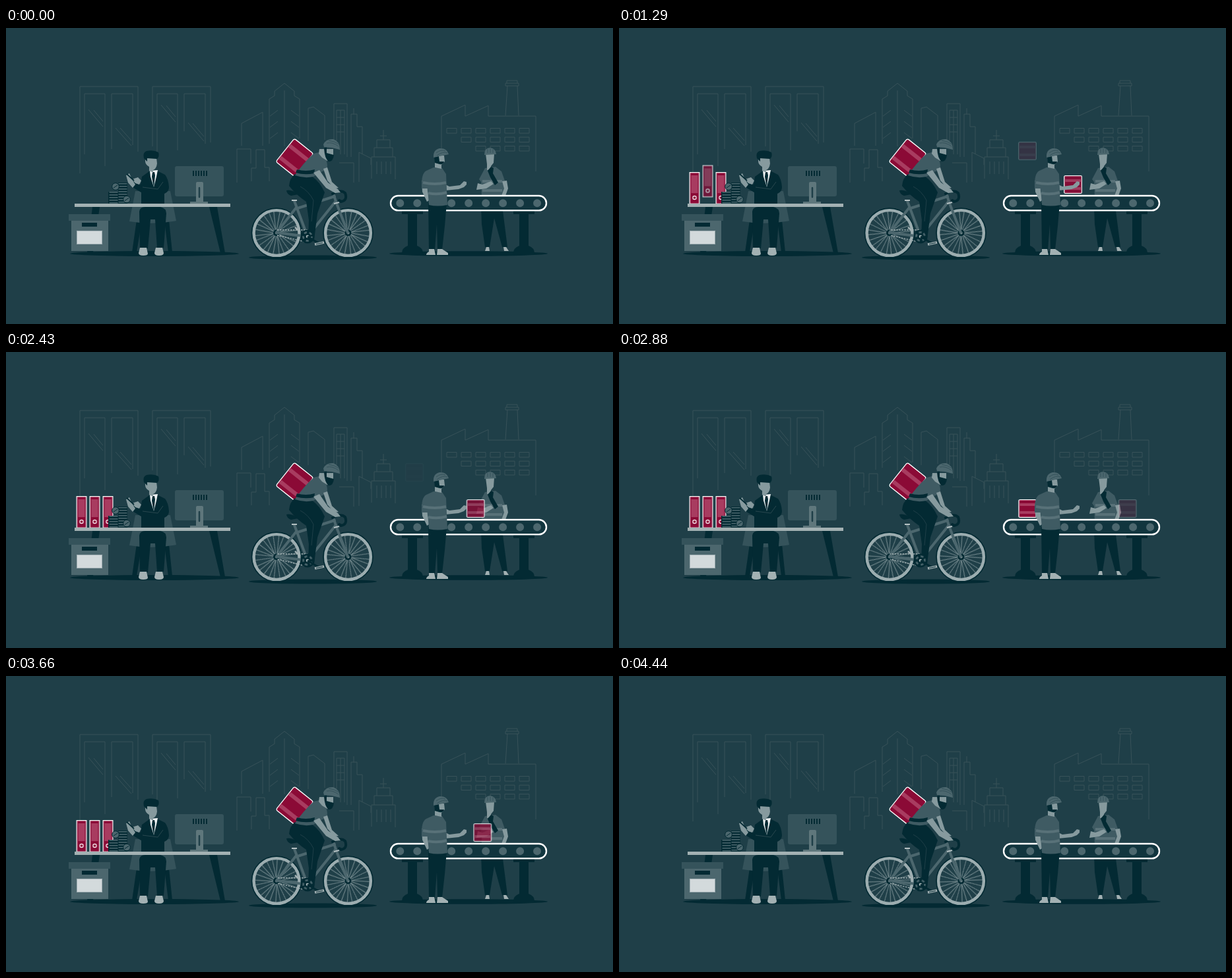
Animation of 920 by 450 pixels, one loop 4.47 s. Source, as an HTML page without scripts:

```html
<!DOCTYPE html>
<html lang="en">
<head>
<meta charset="utf-8">
<title>Work scenes</title>
<style>
  html, body { margin: 0; width: 100%; height: 100%; overflow: hidden; background: #1f3f48; }
  svg { display: block; width: 100%; height: 100%; }

  .dark { fill: #032a33; }
  .deep { fill: #35535b; }
  .cloth { fill: #3f5b63; }
  .mid { fill: #4c676e; }
  .skin { fill: #869a9e; }
  .light { fill: #a3b1b3; }
  .red { fill: #8b0a36; }
  .pink { fill: #a83c60; }
  .line { fill: none; stroke: #385259; }
  .band { fill: none; stroke: #587178; stroke-width: 4; }
  .tube { fill: none; stroke: #4c676e; stroke-width: 4; stroke-linecap: round; stroke-linejoin: round; }
  .edge { stroke: #fff; stroke-width: 1.3; }

  .folder { animation: folder-drop 4470ms infinite both, folder-fade 4470ms linear infinite both; }
  .parcel { animation: parcel-path 4470ms infinite both, parcel-fade 4470ms linear infinite both; }
  .folder, .parcel { animation-delay: var(--at); }
  .spin { animation: spin 1490ms linear infinite; }
  .chain { animation: chain 298ms linear infinite; }

  @keyframes folder-drop {
    0% { transform: translateY(-79px); animation-timing-function: cubic-bezier(.45, 0, .55, 1); }
    6.71%, 100% { transform: none; }
  }
  @keyframes folder-fade {
    0% { opacity: 0; }
    6.71%, 67.34% { opacity: 1; }
    72.48%, 100% { opacity: 0; }
  }
  @keyframes parcel-path {
    0% { transform: translate(0, -55px); animation-timing-function: cubic-bezier(.45, 0, .55, 1); }
    6.71% { transform: translate(0, 0); }
    8.66% { transform: translate(0, 0); animation-timing-function: cubic-bezier(.65, 0, .32, 1); }
    43.56%, 100% { transform: translate(157px, 0); }
  }
  @keyframes parcel-fade {
    0% { opacity: 0; }
    6.71%, 24% { opacity: 1; }
    40.6%, 100% { opacity: 0; }
  }
  @keyframes spin { to { transform: rotate(360deg); } }
  @keyframes chain { to { stroke-dashoffset: -4; } }
</style>
</head>
<body>
<svg viewBox="0 0 920 450" xmlns="http://www.w3.org/2000/svg">
  <defs>
    <g id="folder">
      <rect class="red edge" x=".7" y=".7" width="14.6" height="47.6"/>
      <rect class="pink" x="3" y="5" width="10" height="27"/>
      <circle cx="8" cy="39" r="2.6" fill="none" stroke="#fff" stroke-width="1.2"/>
    </g>
    <g id="parcel">
      <rect class="red edge" x=".7" y=".7" width="26.6" height="26.6" rx="1.5"/>
      <path class="pink" d="M1.4 6H26.6V10H1.4ZM1.4 18H26.6V22H1.4Z"/>
    </g>
    <path id="spokes" d="M1 4L4 33M-1 4L-5 33M2 3L13 30" fill="none" stroke="#93a5a8" stroke-width=".8"/>
    <g id="quarter">
      <use href="#spokes"/>
      <use href="#spokes" transform="rotate(45)"/>
    </g>
    <g id="wheel">
      <circle r="37.4" fill="none" stroke="#032a33" stroke-width="1.8"/>
      <g class="spin">
        <use href="#quarter"/>
        <use href="#quarter" transform="rotate(90)"/>
        <use href="#quarter" transform="rotate(180)"/>
        <use href="#quarter" transform="rotate(270)"/>
      </g>
      <circle r="34.4" fill="none" stroke="#9cadb0" stroke-width="4.4"/>
      <circle class="dark" r="5"/>
      <circle class="light" r="2"/>
    </g>
    <path id="pane-row" d="M0 0h15v7.5H0Zm22 0h15v7.5H22Zm22 0h15v7.5H44Zm22 0h15v7.5H66Z"/>
    <path id="stand" class="dark" d="M0 278H32V283H23V331Q32 334 32 343H0Q0 334 9 331V283H0Z"/>
  </defs>

  <rect width="920" height="450" fill="#1f3f48"/>

  <!-- Backdrop -->
  <g class="line">
    <path d="M112 221V89H200V188M119 192V100H150V210M160 184V100H192V178"/>
    <path d="M125 124L147 150M133 125L147 142M166 152L190 179M173 152L190 171"/>
    <path d="M222 180V89H310V174M229 192V100H260V186M270 157V100H302V176"/>
    <path d="M235 117L257 143M243 118L257 135M276 144L300 172M283 145L300 165"/>

    <path d="M350 235V184H371V206M357 179V145L389 128V179M372 233V213H379V185H392V212H399V233"/>
    <path d="M399 176V108L407 103V96L422 84L437 96V103L445 108V168M422 95V180"/>
    <path d="M400 134L412 125M400 151L412 142M400 168L412 159M432 125L444 134M432 142L444 151M432 159L444 168"/>
    <path d="M458 172V122L466 120L483 133V170M497 171V115H517V196M501 171V125H513V192"/>
    <path d="M501 136H513M501 147H513M501 158H513M507 125V192M505 205H527V235"/>
    <path d="M523 196V131H532V150H540V192M527 131V122M535 234V189L553 198V208"/>
    <path d="M554 229V196H590V230M558 196V182H586V196M562 182V170H582V182M572 170V155M567 164H577M562 203V222M569 203V222M576 203V222M583 203V222"/>

    <path d="M660 187V134L696 117V134L731 118V134H803V218M757 133L760 88M777 133L775 88M757 84H777V88H757ZM759 84V80H775V84"/>
    <path d="M668 152.5h15v7.5H668ZM690 152.5h15v7.5H690ZM690 166h15v7.5H690Z"/>
    <use href="#pane-row" x="712" y="152.5"/>
    <use href="#pane-row" x="712" y="166"/>
    <use href="#pane-row" x="712" y="179.5"/>
  </g>

  <!-- Office -->
  <ellipse class="dark" cx="225" cy="343" rx="128" ry="4"/>
  <path class="dark" d="M131 272H142L132 341H123ZM308 272H320L332 342H325ZM198 292H206L198 341H191ZM240 292H247L252 341H246Z"/>
  <path class="deep" d="M196 248H249L258 293Q222 300 187 294Z"/>
  <path class="mid" d="M99 293H155V339H99Z"/>
  <path class="deep" d="M95 283H158V293H95Z"/>
  <path class="dark" d="M115 296H138V302H115Z"/>
  <rect x="107.5" y="308.5" width="38" height="20" fill="#d3dadc" stroke="#9cabb0"/>

  <rect class="deep" x="256" y="210" width="74" height="46" rx="3"/>
  <path d="M284 217V225M288 217V225M292 217V225M296 217V225M300 217V225M304 217V225" stroke="#032a33" stroke-width="2"/>
  <rect x="288" y="234" width="11" height="32" rx="2" fill="#5f777c"/>
  <path d="M279 264H306V267H279Z" fill="#5f777c"/>
  <path d="M293 243V257" stroke="#1f3f48" stroke-width="2.5" stroke-linecap="round"/>

  <path class="dark" d="M206 226L217 218H231L241 223Q246 229 247 242Q247 249 240 252V268H205V250L190 241L193 232L204 238Z"/>
  <path d="M218 217L230 216L228 226L224 242L219 226Z" fill="#eef1f2"/>
  <path class="dark" d="M222 219H225L226 224L224 243L221 226Z"/>
  <path class="skin" d="M211 197H228L229 206Q228 214 223 216V220L217 217V211Q211 208 211 202Z"/>
  <path class="dark" d="M209 198Q207 189 213 187Q224 185 231 189Q233 195 229 199L214 198V203Z"/>
  <path d="M238 234L230 245L207 242" fill="none" stroke="#29474f"/>
  <path class="skin" d="M182 224L187 221L191 230L196 238L192 243L185 235ZM191 230L200 227L205 232L202 238L196 236Z"/>
  <path d="M183 222L194 232" stroke="#032a33" stroke-width="1.8"/>
  <path class="dark" d="M202 279Q203 272 211 272H234Q243 274 243 282L239 334H229L226 291H219L215 335H203Z"/>
  <path class="light" d="M203 334H213L215 343Q215 346 208 346Q201 346 201 342ZM227 334H237L239 342Q239 346 232 346Q225 346 225 342Z"/>

  <use class="folder" style="--at:680ms" href="#folder" x="146.5" y="219"/>
  <use class="folder" style="--at:880ms" href="#folder" x="106.5" y="219"/>
  <use class="folder" style="--at:1070ms" href="#folder" x="126.5" y="219"/>

  <path class="dark" d="M155 249H170V267H155ZM170 235H184V267H170Z"/>
  <path d="M163 249V267M177 236V267" stroke="#4c676e" stroke-width="13" stroke-dasharray="1.6 2.4"/>
  <g class="mid" stroke="#032a33">
    <circle cx="166" cy="241" r="5.3"/>
    <circle cx="183" cy="260.5" r="5.3"/>
    <path d="M163 243L169 239M180 262.5L186 258.5"/>
  </g>
  <rect class="light" x="104" y="267" width="236" height="5"/>

  <!-- Courier -->
  <ellipse class="dark" cx="465" cy="349" rx="97" ry="3.6"/>
  <use href="#wheel" transform="translate(410 311.5)"/>
  <use href="#wheel" transform="translate(518.5 311.5)"/>
  <path class="tube" d="M410 311L440 273M410 311L457 317L437 263M442 274L498 256M457 317L500 263M496 251L500 264L518 311"/>
  <path class="chain" d="M411 307L457 307M411 315L457 326" fill="none" stroke="#a3b1b3" stroke-width="1.3" stroke-dasharray="2.5 1.5"/>
  <path d="M433 262H441M497 267L505 265" stroke="#b5c1c3" stroke-width="2"/>
  <path class="dark" d="M425 247Q433 245 443 253L432 255Q426 253 425 247Z"/>
  <path d="M495 252Q508 245 514 251Q518 262 508 264L505 262" fill="none" stroke="#032a33" stroke-width="4" stroke-linecap="round"/>

  <g transform="translate(437 168) rotate(38.5)">
    <rect class="red edge" width="37" height="45" rx="3"/>
    <path class="pink" d="M.7 10H36V16H.7ZM.7 33H36V39H.7Z"/>
  </g>
  <path class="dark" d="M438 222L463 225Q476 234 483 250L472 282L467 322H458L459 292L455 264Q440 254 429 240Q430 228 438 222Z"/>
  <path d="M446 241Q459 248 466 262L463 294" fill="none" stroke="#1f3f48"/>
  <path class="cloth" d="M466 191L478 188Q488 198 487 215L475 220L466 226Q452 229 438 224Q449 207 466 191Z"/>
  <path class="dark" d="M441 215Q454 219 468 215L467 221Q453 224 439 220Z"/>
  <path class="skin" d="M466 220L475 216L488 235L503 245L507 250L499 251L485 243ZM481 214L487 212L494 234L504 243L498 244L487 232Z"/>
  <path class="skin" d="M475 184H496V193L487 202L479 197L474 191Z"/>
  <path class="dark" d="M482 183L486 181V190L497 193Q496 203 489 203Q483 199 482 183Z"/>
  <path class="mid" d="M481 177Q485 168 496 169Q506 172 506 185L494 182L482 181Z"/>
  <path d="M486 175Q495 173 504 180M489 171Q498 172 505 177" fill="none" stroke="#35535b"/>

  <circle class="dark" cx="457" cy="317" r="10.5"/>
  <g transform="translate(457 317)">
    <circle class="spin" r="6.5" fill="none" stroke="#4c676e" stroke-width="2.6" stroke-dasharray="4.17 4"/>
  </g>
  <circle class="light" cx="457" cy="317" r="2.3"/>
  <path d="M457 317L475 328" stroke="#032a33" stroke-width="3"/>
  <path d="M468 329L482 326" stroke="#a3b1b3" stroke-width="3.4"/>
  <path d="M470 328.6L480 326.5" stroke="#032a33"/>
  <path d="M438 303L446 310" stroke="#a3b1b3" stroke-width="2.5"/>

  <!-- Factory -->
  <ellipse class="dark" cx="701" cy="343" rx="120" ry="3.8"/>
  <use href="#stand" x="600"/>
  <use href="#stand" x="769"/>

  <path class="dark" d="M720 270H752L760 333H752L740 289L733 333H726L721 298Z"/>
  <path class="light" d="M728 333H732L733 339H726ZM754 333H758L762 339H755Z"/>
  <path class="cloth" d="M726 213L742 211L751 218L757 235L753 258H721L720 234L717 230Z"/>
  <path class="band" d="M722 233H752M722 247H752"/>
  <path class="skin" d="M752 233L759 232L761 244L757 255H751L755 244Z"/>
  <path class="skin" d="M727 191H740L739 205L735 210V215L729 216V207Z"/>
  <path class="skin" d="M715 236L722 238L735 233L739 237L728 244L713 246Z"/>
  <path class="dark" d="M730 217L735 211L739 213L738 221L746 235L741 239L734 227Z"/>
  <path class="mid" d="M725 193Q725 182 734 182Q742 183 743 192Z"/>
  <path d="M730 184V190M734 183V190M738 184V190" stroke="#35535b"/>

  <rect x="583" y="255" width="236" height="22.4" rx="11.2" fill="#11353e" stroke="#fff" stroke-width="2.4"/>
  <path d="M597.3 266.3H806" stroke="#4c676e" stroke-width="12" stroke-linecap="round" stroke-dasharray="0 25.97"/>

  <use class="parcel" style="--at:173ms" href="#parcel" x="605" y="224"/>
  <use class="parcel" style="--at:1233ms" href="#parcel" x="605" y="224"/>
  <use class="parcel" style="--at:2423ms" href="#parcel" x="605" y="224"/>

  <path class="dark" d="M640 266H668L665 301L661 337H654L653 298L650 337H641Z"/>
  <path class="light" d="M641 336H649L651 345H637Q637 342 641 340ZM654 336H661L670 342V345H653Z"/>
  <path class="skin" d="M630 232H638L639 248L643 261L638 264L631 249Z"/>
  <path class="skin" d="M664 237L672 241L688 239L694 233L698 234V238L694 242L686 245L666 247Z"/>
  <path class="cloth" d="M648 212L661 213L667 222L669 269Q654 272 641 269L639 244H630Q629 221 637 217Z"/>
  <path class="band" d="M632 235Q650 239 667 235M640 251Q654 254 668 250"/>
  <path class="skin" d="M650 194H664L665 203L660 208V214L650 212Z"/>
  <path class="dark" d="M649 195H656L657 203L664 203Q663 208 657 207L650 205Z"/>
  <path class="mid" d="M648 197Q647 185 657 183Q668 182 671 192Z"/>
  <path d="M652 190Q659 184 666 187M653 194Q662 187 669 190" fill="none" stroke="#35535b"/>
</svg>
</body>
</html>
```
